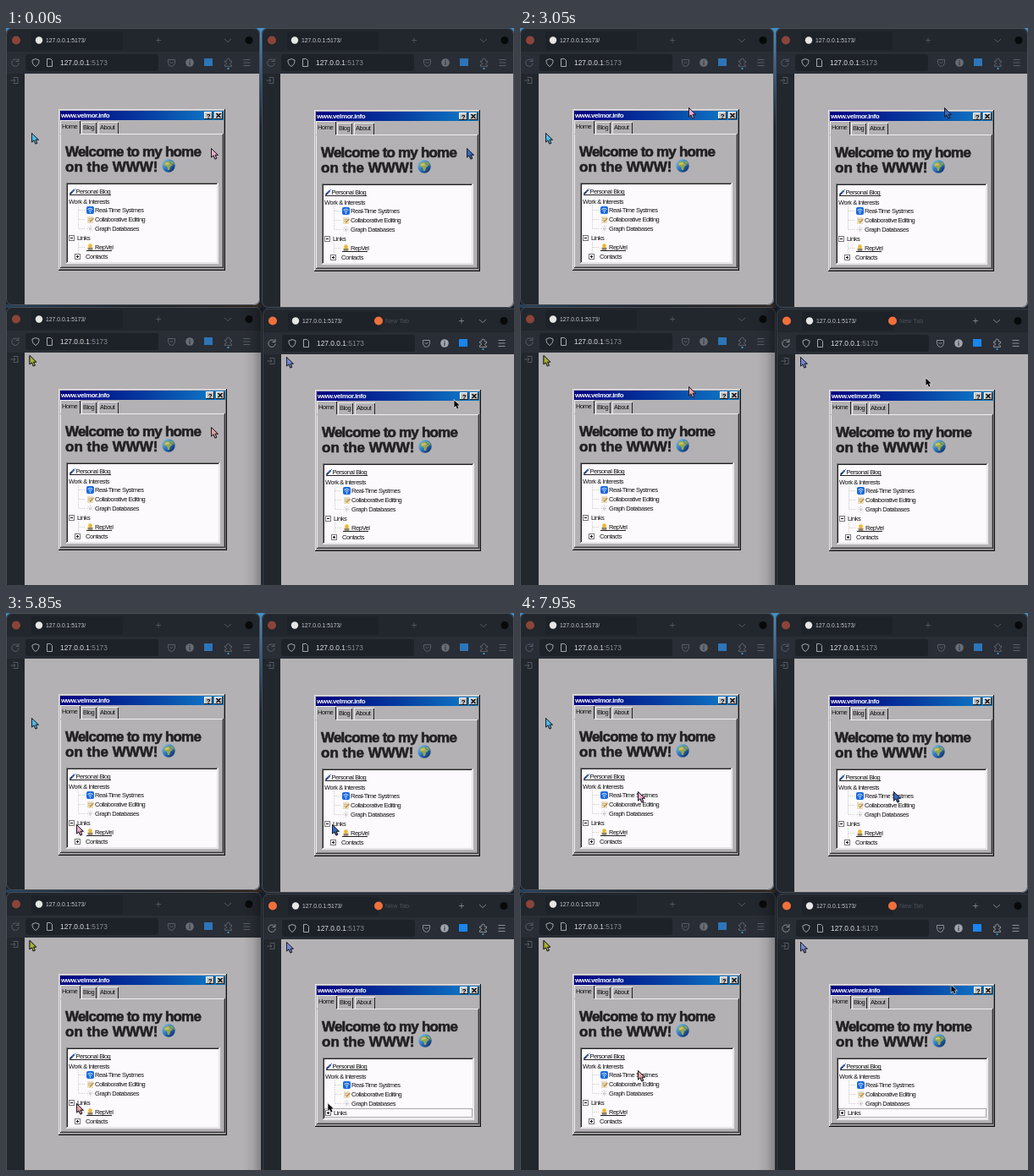
An HTML page with a canvas for the animation above (8000 ms loop, 600 by 659 pixels).

```html
<!DOCTYPE html>
<html lang="en">
<head>
<meta charset="utf-8">
<title>Shared cursors</title>
<style>
  html, body { margin: 0; width: 100%; height: 100%; overflow: hidden; background: #15181d; }
  canvas { display: block; }
</style>
</head>
<body>
<canvas id="stage" width="600" height="659"></canvas>
<script>
const ctx = document.getElementById('stage').getContext('2d');
const LOOP = 8000;
const LAG = 300;
const TOGGLES = [5500, 6350, 7150];
const GRAY = '#b3b1b3';
const FIELD = '#1d2128';

// Mouse path in the lower right window: time, x, y
const PATH = [
  [-300, 545, 475], [0, 529, 440], [1550, 411, 443], [1850, 360, 499],
  [2750, 502, 427], [3050, 479, 414], [4350, 427, 597], [4650, 404, 592],
  [5550, 386, 583], [5850, 380, 580], [6350, 387, 590], [6650, 382, 584],
  [7650, 442, 544], [7950, 509, 440], [8050, 522, 424]
];

// Cubic curve through the path points
function mouseAt(t) {
  const i = Math.max(PATH.findIndex(p => p[0] > t) - 1, 0);
  const a = PATH[i], b = PATH[i + 1];
  const span = b[0] - a[0], u = (t - a[0]) / span;
  const slope = (k, axis) => {
    const p = PATH[Math.max(k - 1, 0)], n = PATH[Math.min(k + 1, PATH.length - 1)];
    return (n[axis] - p[axis]) / (n[0] - p[0]) * span;
  };
  return [1, 2].map(axis =>
    (2 * u ** 3 - 3 * u ** 2 + 1) * a[axis] + (u ** 3 - 2 * u ** 2 + u) * slope(i, axis) +
    (3 * u ** 2 - 2 * u ** 3) * b[axis] + (u ** 3 - u ** 2) * slope(i + 1, axis));
}

function rect(x, y, w, h, color) {
  ctx.fillStyle = color;
  ctx.fillRect(x, y, w, h);
}

function rounded(x, y, w, h, r, color) {
  ctx.fillStyle = color;
  ctx.beginPath();
  ctx.roundRect(x, y, w, h, r);
  ctx.fill();
}

function circle(x, y, r, color) {
  ctx.fillStyle = color;
  ctx.beginPath();
  ctx.arc(x, y, r, 0, 7);
  ctx.fill();
}

function stroke(path, color, width = 1) {
  ctx.strokeStyle = color;
  ctx.lineWidth = width;
  ctx.stroke(new Path2D(path));
}

function shape(path, color) {
  ctx.fillStyle = color;
  ctx.fill(new Path2D(path));
}

function text(str, x, y, size = 7.5, color = '#111', spacing = -0.45, weight = 400) {
  ctx.font = `${weight} ${size}px "Liberation Sans", Arial, sans-serif`;
  ctx.letterSpacing = spacing + 'px';
  ctx.fillStyle = color;
  ctx.fillText(str, x, y);
}

function heading(str, y, spacing) {
  text(str, 8, y, 17, '#222022', spacing, 700);
  ctx.strokeStyle = '#222022';
  ctx.lineWidth = 0.6;
  ctx.strokeText(str, 8, y);
}

function at(x, y, draw) {
  ctx.save();
  ctx.translate(x, y);
  draw();
  ctx.restore();
}

function gradient(x0, y0, x1, y1, ...colors) {
  const g = ctx.createLinearGradient(x0, y0, x1, y1);
  colors.forEach((c, i) => g.addColorStop(i / (colors.length - 1), c));
  return g;
}

// Four one-pixel edges: top and left, then bottom and right
function edges(x, y, w, h, light, dark) {
  rect(x, y, w, 1, light);
  rect(x, y, 1, h, light);
  rect(x, y + h - 1, w, 1, dark);
  rect(x + w - 1, y, 1, h, dark);
}

function browser({ x, y, w, h, right, active }) {
  const icon = active ? '#8c9097' : '#5a5f68';
  const fox = active ? '#f0703c' : '#8a4538';
  at(x, y, () => {
    ctx.beginPath();
    ctx.roundRect(0, 0, w, h, 7);
    ctx.clip();
    rect(0, 0, w, h, '#22262d');
    rect(0, 28, w, 26, '#292d35');
    rect(22, 54, w, h, GRAY);
    rect(0, 0, w, 1, active ? '#50545b' : '#35404c');

    rounded(30, 4, 108, 22, 3, FIELD);
    circle(12, 14.5, 5, fox);
    circle(39, 14.5, 4.2, '#e6e6e6');
    text('127.0.0.1:5173/', 47, 17, 6.8, '#c6c9ce', 0);
    if (active) {
      circle(137, 14.5, 5, fox);
      text('New Tab', 145, 17, 7.2, '#4d525a', 0);
    }
    const plus = active ? 235 : 180;
    stroke(`M${plus - 3} 14.5h6M${plus} 11.5v6`, icon, 0.8);
    stroke(`M${right - 42} 13l4 3.5l4 -3.5`, icon, 0.9);
    circle(right - 13, 14.5, 4.5, '#08090b');

    stroke('M14.2 38.5a4.2 4.2 0 1 0 1 3M15 36v3.5h-3.5', icon);
    rounded(23, 31, 157, 20, 3, FIELD);
    stroke('M35 36.5l4 1.5q.3 5-4 7.5q-4.3-2.5-4-7.5z', '#a4a8ae');
    stroke('M48.5 36.5h4l2 2v7h-6z', '#a4a8ae');
    text('127.0.0.1', 64, 44.3, 8.4, '#dfe1e4', 0);
    text(':5173', 64 + ctx.measureText('127.0.0.1').width, 44.3, 8.4, '#858a92', 0);

    at(right - 300, 0, () => {
      stroke('M191.5 37.5h8v4q-1 4-4 4q-3 0-4-4zM193.5 40l2 2l2-2', icon);
      circle(217, 41, 4.8, active ? '#a0a4ab' : '#686c74');
      rect(216.5, 38, 1, 1.3, '#292d35');
      rect(216.5, 40, 1, 4, '#292d35');
      rect(234, 36, 10, 9, active ? '#1985ee' : '#2d75b9');
      stroke('M258.5 39h2q0-3 2-3t2 3h2v2q-2 0-2 1.5t2 1.5v1.5h-8v-2q2 0 2-1.5t-2-1.5z', icon);
      circle(262.5, 48, 1.1, '#3aa9dd');
      stroke('M280.5 37.5h8M280.5 41h8M280.5 44.5h8', icon);
    });
    stroke('M8.5 58.5h5.5v7h-5.5M5.5 62h5M9 60l2 2l-2 2', '#5c626b', 0.9);
  });
  ctx.strokeStyle = active ? '#3b4047' : '#4b4f56';
  ctx.lineWidth = 1;
  ctx.beginPath();
  ctx.roundRect(x + 0.5, y + 0.5, w - 1, h - 1, 7);
  ctx.stroke();
}

function globe(x, y) {
  at(x, y, () => {
    circle(0, 0, 7.7, gradient(-6, -6, 6, 6, '#6fbbe8', '#2a74c4', '#102f68'));
    shape('M-5 -4L0 -6L2 -3L5 -1L2 1L1 5L-1 5L-2 1L-5 0Z', '#94a850');
    shape('M-4 -3L0 -4L1 -2L-4 -1Z', '#d8c468');
    shape('M1 -6L5 -5L7 -1L5 -2L3 -3Z', '#8ba654');
  });
}

function expander(x, y, closed) {
  rect(x - 3.5, y - 3.5, 7, 7, '#777');
  rect(x - 2.5, y - 2.5, 5, 5, '#fff');
  rect(x - 1.5, y - 0.5, 3, 1, '#000');
  if (closed) rect(x - 0.5, y - 1.5, 1, 3, '#000');
}

function dotted(path, color = '#bbb') {
  ctx.setLineDash([1, 1]);
  stroke(path, color);
  ctx.setLineDash([]);
}

function titleButton(x, symbol) {
  rect(x, 4, 10, 9, '#c3c1c3');
  edges(x, 4, 10, 9, '#fff', '#222');
  if (symbol === '?') text('?', x + 2.7, 11.5, 8, '#000', 0, 700);
  else stroke(`M${x + 2.5} 6l5 5m0-5l-5 5`, '#000', 1.3);
}

function tree(w, h, closed, focus) {
  rect(9, 88, w - 17, h - 96, '#fcfafc');
  edges(9, 88, w - 17, h - 96, '#777', '#eee');
  edges(10, 89, w - 19, h - 98, '#222', '#e4e2e4');

  stroke('M13.5 101.5l5-5', '#1b3474', 1.8);
  stroke('M16 99l4-4', '#3e79cc', 1);
  text('Personal Blog', 20.5, 100.7);
  rect(13, 102, 49, 1, '#222');
  text('Work & Interests', 12, 112.7);

  dotted('M23.5 115v28M24 120.5h7M24 131.5h7M24 142.5h7', '#ccc');
  rounded(33, 116, 9, 9, 2, '#1769dc');
  stroke('M34.5 119.5q3-2.5 6 0M35.8 121.3q1.7-1.5 3.4 0', '#fff', 0.9);
  circle(37.5, 123, 0.8, '#fff');
  text('Real-Time Systmes', 43, 123.2);

  rect(34, 128, 7, 8, '#eadfbd');
  stroke('M35 130.5h5M35 132.5h4', '#b5a888', 0.7);
  stroke('M37 134.5l4.5-4.5', '#c68a3f', 1.3);
  text('Collaborative Editing', 43, 134.2);

  ctx.setLineDash([1.5, 1]);
  stroke('M33.5 142.5h8M37.5 138.5v8M34.7 139.7l5.6 5.6M40.3 139.7l-5.6 5.6', '#c4c4c4', 0.9);
  ctx.setLineDash([]);
  text('Graph Databases', 43, 145.2);

  expander(15.5, 153.5, closed);
  text('Links', 22, 156.2);
  if (focus) dotted(`M11.5 148.5H${w - 10.5}V158.5H11.5Z`, '#555');
  if (closed) return;

  dotted('M23.5 158v14M24 164.5h7', '#ccc');
  circle(37.5, 162.5, 2.3, '#edb72e');
  rect(34.5, 164.5, 6, 3, '#c6932d');
  rect(35, 165.5, 5, 2, '#777d88');
  text('RepVel', 43, 167.2);
  rect(33, 168, 30, 1, '#222');
  expander(22.5, 175.5, true);
  text('Contacts', 32, 178.2);
}

function dialog({ x, y, w }, closed = false, focus = false) {
  const h = closed ? 170 : 192;
  at(x, y + (closed ? 11 : 0), () => {
    rect(0, 1, w, h - 1, GRAY);
    edges(0, 1, w, h - 1, '#e6e4e6', '#111');
    rect(1, h - 2, w - 2, 1, '#777');
    rect(w - 2, 2, 1, h - 3, '#777');
    rect(2, 3, w - 4, 11, gradient(2, 0, w - 2, 0, '#000080', '#06399f', '#1080cb'));
    text('www.velmor.info', 3, 11.3, 8, '#fff', -0.4, 700);
    titleButton(w - 25, '?');
    titleButton(w - 13, 'x');

    edges(2, 30, w - 4, h - 33, '#efedef', '#333');
    rect(w - 4, 31, 1, h - 35, '#858385');
    rect(3, h - 5, w - 6, 1, '#858385');
    for (const [label, left, right, top] of [['Blog', 27, 45, 16], ['About', 47, 71, 16], ['Home', 2, 26, 14]]) {
      const front = label === 'Home';
      rect(left, top, right - left, (front ? 31 : 30) - top, GRAY);
      rect(left, top, right - left, 1, '#efedef');
      rect(left, top, 1, 30 - top, '#efedef');
      rect(right - 1, top + 1, 1, 29 - top, '#222');
      text(label, left + 2, front ? 24.3 : 25.3);
    }

    heading('Welcome to my home', 56.5, -0.8);
    heading('on the WWW!', 74.5, 0);
    globe(130, 68);
    tree(w, h, closed, focus);
  });
}

function arrow(x, y, fill, outline = '#20202a', scale = 1) {
  at(x, y, () => {
    ctx.scale(scale, scale);
    const path = 'M.5 .5V11L3 8.8L4.8 13L6.8 12.2L5 8.2H8.3Z';
    stroke(path, outline, scale < 1 ? 1.6 : 1);
    shape(path, fill);
    if (scale === 1) stroke(path, outline, 1);
  });
}

function hand(x, y) {
  at(x, y, () => {
    const path = 'M-1 1Q0 -.5 1 1V4L5 5V8L4 11H-1L-4 7L-3 6L-1 7Z';
    shape(path, '#fff');
    stroke(path, '#111', 0.9);
    stroke('M2.3 4.5v2M3.8 5v2', '#111', 0.6);
  });
}

const BROWSERS = [
  { x: 0, y: 0, w: 300, h: 328, right: 300 },
  { x: 302, y: 0, w: 298, h: 331, right: 300 },
  { x: 0, y: 330, w: 302, h: 340, right: 300 },
  { x: 303, y: 332, w: 307, h: 340, right: 298, active: true }
];
const DIALOGS = [
  { x: 62, y: 95, w: 197 },
  { x: 364, y: 96, w: 196 },
  { x: 62, y: 426, w: 199 },
  { x: 365, y: 427, w: 196 }
];
const REMOTES = [[0, 0, '#eba9cb'], [302, 0, '#3469c4'], [0, 330, '#e3a0a3']];

function render(t) {
  const clicks = TOGGLES.filter(time => t >= time).length;
  const closed = clicks % 2 === 1;

  rect(0, 0, 600, 659, gradient(0, 0, 0, 120, '#4590c9', '#17202b'));
  rect(0, 327, 302, 4, gradient(0, 0, 302, 0, '#23425d', '#1b222b', '#30241d'));
  BROWSERS.slice(0, 3).forEach(browser);
  rect(280, 331, 23, 328, gradient(280, 0, 303, 0, 'rgba(0,0,0,0)', 'rgba(0,0,0,.08)', 'rgba(0,0,0,.3)'));
  browser(BROWSERS[3]);
  DIALOGS.forEach((d, i) => i < 3 ? dialog(d) : dialog(d, closed, clicks > 0));

  arrow(30, 124, '#4dbbe5');
  arrow(27.5, 387, '#a9b52b');
  arrow(331, 389, '#7189d5');

  const [rx, ry] = mouseAt(t - LAG);
  for (const [dx, dy, color] of REMOTES) arrow(rx - 303 + dx, ry - 333 + dy, color);

  const [mx, my] = mouseAt(t);
  const overLink = !closed && mx > 397 && mx < 429 && my > 585 && my < 598;
  if (overLink) hand(mx, my);
  else arrow(mx, my, '#050505', '#d8d8d8', 0.8);
}

function frame(now) {
  render(Math.floor(now % LOOP / 50) * 50);
  requestAnimationFrame(frame);
}
requestAnimationFrame(frame);
</script>
</body>
</html>
```
